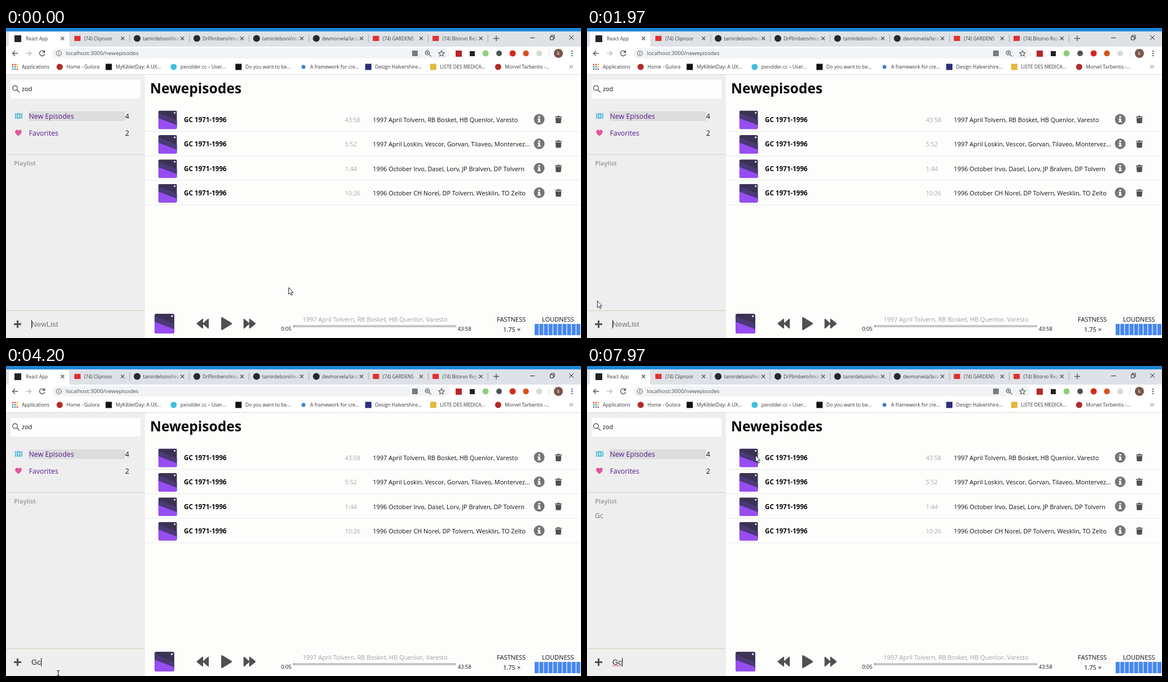
Recreate the animation shown at these times as an HTML page. Size 1018 by 550 pixels, loop 8000 ms.

```html
<!DOCTYPE html>
<html lang="en">
<head>
<meta charset="utf-8">
<title>Podcast player</title>
<style>
html, body { margin: 0; width: 100%; height: 100%; overflow: hidden; background: #fdfdfc; }
#stage { display: block; width: 1018px; height: 550px; font-family: "Open Sans", "Noto Sans", sans-serif; }
text { white-space: pre; }
.tab { font-size: 8.4px; fill: #3c4043; }
.mark { font-size: 8.6px; fill: #333639; }
.line { fill: none; stroke: #55585c; stroke-width: 1.4; }
.nav { font-size: 12.3px; fill: #551a8b; }
.title { font-size: 11.6px; font-weight: 700; fill: #080808; }
.time { font-size: 10.6px; fill: #a6a6a6; }
.desc { font-size: 10.9px; fill: #111; }
.small { font-size: 9.3px; fill: #111; }
.label { font-size: 11px; fill: #111; }
.input { font: 13.25px "Liberation Sans", Arial, sans-serif; fill: #222; }
.icon { fill: #505050; }
.caret { fill: #111; }

/* 8 s timeline: 1% = 80 ms */
#hint, #one, #two, #wavy, #item, #arrow, #beam { animation: 8s step-end infinite; }
#hint { animation-name: hint; }
#one { animation-name: one; }
#two { animation-name: two; }
#wavy { animation-name: wavy; }
#item { animation-name: item; }
#arrow { animation-name: arrowShow; }
#beam { animation-name: beamShow; }
@keyframes hint { 0% { visibility: visible } 52.125%, 100% { visibility: hidden } }
@keyframes one { 0% { visibility: hidden } 52.125% { visibility: visible } 52.5%, 100% { visibility: hidden } }
@keyframes two { 0% { visibility: hidden } 52.5%, 100% { visibility: visible } }
@keyframes wavy { 0% { visibility: hidden } 63%, 100% { visibility: visible } }
@keyframes item { 0% { visibility: hidden } 66.75%, 100% { visibility: visible } }
@keyframes arrowShow { 0% { visibility: visible } 28.5% { visibility: hidden } 80.6%, 100% { visibility: visible } }
@keyframes beamShow { 0% { visibility: hidden } 28.5% { visibility: visible } 80.6%, 100% { visibility: hidden } }
#arrowPath { animation: arrowMove 8s ease-in-out infinite; }
#beamPath { animation: beamMove 8s linear infinite; }
@keyframes arrowMove {
  0%, 12% { transform: translate(500px, 460px) }
  19.8%, 22.5% { transform: translate(0, 470px) }
  29.5% { transform: translate(92px, 540px) }
  78.8% { transform: translate(92px, 540px); animation-timing-function: ease-in }
  80.6% { transform: translate(135px, 512px); animation-timing-function: linear }
  87.1% { transform: translate(356px, 410px); animation-timing-function: linear }
  90.5% { transform: translate(385px, 300px); animation-timing-function: ease-out }
  97.2%, 100% { transform: translate(298px, 158px) }
}
@keyframes beamMove {
  0%, 28.5% { transform: translate(78px, 534px) }
  29.5%, 78.8% { transform: translate(92px, 545px) }
  80.6%, 100% { transform: translate(135px, 520px) }
}
</style>
</head>
<body>
<svg id="stage" viewBox="0 0 1018 550">
  <defs>
    <linearGradient id="fade"><stop offset="0" stop-color="#dee1e6" stop-opacity="0"/><stop offset="1" stop-color="#dee1e6"/></linearGradient>
    <clipPath id="round"><rect width="33" height="33" rx="3"/></clipPath>
    <g id="cover" clip-path="url(#round)">
      <path fill="#3b3254" d="M0 0h33v33H0z"/>
      <path fill="#4c3978" d="M0 4 33 17v10L0 14z"/>
      <path fill="#974df2" d="M0 13.500 33 26v7H0z"/>
      <circle cx="29" cy="4" r="1.6" fill="#e4e0ee"/>
    </g>
    <g id="info">
      <circle r="9.5" fill="#757575"/>
      <path fill="#fff" d="M-1.6-5.8h3.2v2.8h-3.2zM-2.8-1.6h4.4v5h1.3v1.8h-5.8V3.4h1.3V.2h-1.2z"/>
    </g>
    <path id="bin" class="icon" d="M-6-5.5h3.6l.8-1.2h3.2l.8 1.2H6v1.6H-6zM-5.2-3h10.4l-.6 8.3q-.1 1.2-1.3 1.2h-6.6q-1.2 0-1.3-1.2z"/>
    <path id="cross" class="line" d="M-3-3 3 3M3-3-3 3"/>
    <path id="skip" class="icon" d="M-10-7.5q0-2 1.5-1L0-1v-6.5q0-2 1.5-1L11-1q1 1 0 2L1.5 8.5Q0 9.5 0 7.5V1l-8.5 7.5q-1.5 1-1.5-1z"/>
  </defs>

  <rect width="1018" height="550" fill="#fdfdfc"/>

  <!-- browser -->
  <rect width="1018" height="34" fill="#dee1e6"/>
  <rect width="1018" height="6" fill="#1c86d8"/>
  <rect y="33" width="1018" height="49" fill="#fff"/>
  <path fill="#fff" d="M1 34q4 0 4-4V11q0-4 4-4h99q4 0 4 4v19q0 4 4 4z"/>
  <rect x="15" y="13" width="12" height="12" fill="#20232a"/>
  <text class="tab" x="35" y="22">React App</text>
  <use href="#cross" x="100" y="18.5"/>
  <g id="tabs"></g>
  <path class="line" d="M863 18.5h10M868 13.5v10"/>
  <path class="line" style="stroke:#222;stroke-width:1" d="M928 17.5h8M963.5 15.5h5.500v5.500h-5.500zM965 15v-2h6v6h-2M997 13l8 8M1005 13l-8 8"/>
  <path class="line" d="M21 45H11.500M16 40.500 11.500 45l4.500 4.500"/>
  <path class="line" style="stroke:#babcbe" d="M35 45h9.500M40 40.500l4.500 4.500-4.500 4.500"/>
  <path class="line" d="M67.500 41.500A4.700 4.700 0 1 0 68.700 46"/>
  <path fill="#55585c" d="M69 39v5h-5z"/>
  <rect x="82" y="36" width="704" height="18" rx="9" fill="#f1f3f4"/>
  <circle class="line" style="stroke-width:1" cx="93.5" cy="45" r="4.5"/>
  <path class="line" style="stroke-width:1.2" d="M93.500 44.500v3M93.500 42v1.200"/>
  <text x="106" y="48.3" font-size="9.76" fill="#4a4e52">localhost:3000/newepisodes</text>
  <rect x="719" y="40" width="10" height="10" fill="#777b80"/>
  <g class="line" style="stroke-width:1.2"><circle cx="746" cy="44" r="3.7"/><path d="m749 47 3.500 3.500M744 44h4M746 42v4"/></g>
  <path class="line" style="stroke-width:1.1" d="m771 40 1.500 3.400 3.700.4-2.800 2.500.8 3.700-3.200-1.900-3.200 1.900.8-3.700-2.800-2.500 3.700-.4z"/>
  <rect x="796" y="40" width="11" height="11" fill="#b5262b"/>
  <rect x="821" y="41" width="9" height="9" fill="#222"/>
  <circle cx="849" cy="45" r="5.5" fill="#8fd07c"/>
  <circle cx="873" cy="45" r="5" fill="#4c5358"/>
  <circle cx="897" cy="45" r="5.5" fill="#d6281e"/>
  <circle cx="920.5" cy="45" r="5.2" fill="#d8501c"/>
  <circle cx="944" cy="45" r="5.3" fill="#d9d9d6"/>
  <path stroke="#d5d7da" d="M961.500 38v14"/>
  <circle cx="978" cy="45" r="8" fill="#795548"/>
  <text x="978" y="48" font-size="8.5" fill="#fff" text-anchor="middle">k</text>
  <g fill="#55585c"><circle cx="1002" cy="41" r="1.2"/><circle cx="1002" cy="45" r="1.2"/><circle cx="1002" cy="49" r="1.2"/></g>
  <g id="marks"></g>
  <path class="line" style="stroke-width:1" d="m997.500 66 2.500 2.700-2.500 2.700M1001 66l2.500 2.700-2.500 2.700"/>
  <path stroke="#d9dad4" d="M0 82.500h1018"/>

  <!-- sidebar -->
  <rect y="83" width="246" height="467" fill="#eeeeef"/>
  <rect x="8" y="92" width="230" height="33" fill="#fefefe"/>
  <g class="line"><circle cx="16" cy="106.5" r="4.3"/><path d="m19 109.500 5 5"/></g>
  <text x="28" y="112" font-size="10.8" fill="#111">zod</text>
  <rect x="40" y="148" width="171" height="17" fill="#dcdcdd"/>
  <path fill="#62bdd8" d="M16 151h2v10h-2zM27 151h2v10h-2zM19 151h7v10h-7z"/>
  <path stroke="#e9f6fa" d="M22.500 153v6M20 156h5"/>
  <text class="nav" x="40.5" y="161">New Episodes</text>
  <path fill="#e0559b" d="M22 191.500c-9-6-5.500-11-2.700-11 1.600 0 2.400 1 2.700 2 .3-1 1.100-2 2.700-2 2.800 0 6.300 5-2.700 11z"/>
  <text class="nav" x="40.5" y="191">Favorites</text>
  <g font-size="12.3" fill="#111"><text x="211" y="161">4</text><text x="211" y="191">2</text></g>
  <path stroke="#d3d3ca" d="M0 224.500h246"/>
  <text x="14" y="243.5" font-size="10.7" font-weight="700" fill="#a6a6a6">Playlist</text>
  <text id="item" x="14" y="270" font-size="12.4" fill="#777">Gc</text>
  <path stroke="#cfcfb6" d="M0 501.500h246"/>
  <path stroke="#505050" stroke-width="3" d="M14 525.500h13M20.500 519v13"/>
  <g class="input">
    <g id="hint"><text x="45" y="530" fill="#757575">NewList</text><rect class="caret" x="45" y="518" width="1" height="15"/></g>
    <g id="one"><text x="45" y="530">G</text><rect class="caret" x="55" y="518" width="1" height="15"/></g>
    <g id="two"><text x="45" y="530">Gc</text><rect class="caret" x="62" y="518" width="1" height="15"/></g>
    <path id="wavy" fill="none" stroke="#d33" stroke-width=".9" d="m45 532.500 1.500-1.200 1.500 1.200 1.500-1.200 1.500 1.200 1.500-1.200 1.500 1.200 1.500-1.200 1.500 1.200 1.500-1.200 1.500 1.200 1.500-1.200"/>
  </g>

  <!-- episodes -->
  <text x="255" y="116" font-size="24.5" font-weight="700" fill="#080808">Newepisodes</text>
  <g id="rows"></g>

  <!-- player -->
  <use href="#cover" transform="translate(263 507) scale(1.06)"/>
  <use href="#skip" transform="translate(349 524.5) scale(-1 1)"/>
  <path class="icon" d="M381 515q0-3 2.500-1.500l15.500 9.500q2 1.500 0 3l-15.500 9.500q-2.500 1.500-2.500-1.500z"/>
  <use href="#skip" x="430.5" y="524.5"/>
  <text class="desc" style="fill:#a0a0a0" x="525" y="520.5">1997 April Tolvern, RB Bosket, HB Quenlor, Varesto</text>
  <rect x="509" y="527" width="288" height="4" fill="#c6c6c6"/>
  <rect x="509" y="527" width="1.2" height="4" fill="#4a6fa8"/>
  <text class="small" x="487" y="536.5">0:05</text>
  <text class="small" x="800" y="536.5">43:58</text>
  <text class="label" x="869" y="520.5">FASTNESS</text>
  <text class="label" x="880" y="539">1.75 ×</text>
  <text class="label" x="949" y="520.5">LOUDNESS</text>
  <g id="bars" fill="#4687f1"></g>

  <!-- pointers -->
  <g id="arrowPath"><path id="arrow" fill="#fff" stroke="#111" stroke-width=".9" d="M.5.5v12l2.700-2.400 1.900 4.200 1.900-.9-1.900-4h3.500z"/></g>
  <g id="beamPath"><path id="beam" fill="none" stroke="#222" stroke-width="1.1" d="M-2-4.500h1.500l1 .7 1-.7H3M.5-4v8M-2 4.500h1.500l1-.7 1 .7H3"/></g>
</svg>
<script>
const fill = (id, list, draw) => { document.getElementById(id).innerHTML = list.map(draw).join(''); };
const dot = (x, y, r, color) => `<circle cx="${x}" cy="${y}" r="${r}" fill="${color}"/>`;
const box = (x, y, w, h, color) => `<rect x="${x - w / 2}" y="${y - h / 2}" width="${w}" height="${h}" fill="${color}"/>`;
const text = (cls, x, y, s) => `<text class="${cls}" x="${x}" y="${y}">${s}</text>`;

const tabs = [
  ['video', '(74) Clipnoor'], ['code', 'tamirdelsoni/react'], ['code', 'DrPlimbero/music'],
  ['code', 'tamirdelsoni/react'], ['code', 'devmorvela/laravel'], ['video', '(74) GARDENS'], ['video', '(74) Bitorvo Repo']
];
fill('tabs', tabs, ([kind, name], i) => {
  const x = 126.5 + i * 105.7, isVideo = kind === 'video';
  const left = x + (isVideo ? 12 : 10);
  return (isVideo ? box(x, 18.5, 11, 9, '#e02f2f') : dot(x, 18.5, 6, '#24292e'))
    + `<svg x="${left}" y="8" width="${x + 76 - left}" height="22">${text('tab', 0, 14, name)}</svg>`
    + `<rect x="${x + 62}" y="9" width="15" height="20" fill="url(#fade)"/>`
    + `<use href="#cross" x="${x + 80}" y="18.5"/><path stroke="#a3a6aa" d="M${x + 92.5} 12v13"/>`;
});

const marks = [
  ['Home - Gulora', dot, '#b22b27'], ['MyKibletDay: A UX...', box, '#111'], ['pxnolder.cc – User...', dot, '#3fc0da'],
  ['Do you want to be...', box, '#111'], ['A framework for cre...', dot, '#3b82d0'], ['Design Halvershire...', box, '#2b2f7e'],
  ['LISTE DES MEDICA...', box, '#e2b93a'], ['Morvel Tarbentis -...', dot, '#b22b27']
];
const apps = ['#d9483b', '#d9483b', '#e8b02c', '#3c9a52', '#4b7fd6', '#e8b02c', '#3c9a52', '#4b7fd6', '#d9483b'];
// The first bookmark is short; the others are cut to one width.
fill('marks', marks, ([name, shape, color], i) => {
  const x = i ? 67 + i * 114.9 : 95;
  const icon = shape === dot ? dot(x, 69, i === 4 ? 3.5 : 5.5, color) : box(x, 69, 11, 11, color);
  return icon + text('mark', x + 12, 72, name);
});
document.getElementById('marks').innerHTML += text('mark', 28, 72, 'Applications')
  + apps.map((c, i) => box(12 + i % 3 * 4, 65 + Math.floor(i / 3) * 4, 2.5, 2.5, c)).join('');

const rows = [
  ['43:58', '1997 April Tolvern, RB Bosket, HB Quenlor, Varesto'],
  ['5:52', '1997 April Loskin, Vescor, Gorvan, Tilaveo, Montervez...'],
  ['1:44', '1996 October Irvo, Dasel, Lorv, JP Bralven, DP Tolvern'],
  ['10:26', '1996 October CH Norel, DP Tolvern, Wesklin, TO Zelto']
];
fill('rows', rows, ([time, desc], i) => `<g transform="translate(0 ${i * 43.4})">
  <use href="#cover" x="269.7" y="146.5"/>
  ${text('title', 315, 167, 'GC 1971-1996')}${text('time', 600, 167, time)}${text('desc', 649.5, 167, desc)}
  <use href="#info" x="944" y="162"/><use href="#bin" x="978" y="162.5"/>
  <path stroke="#dcdce4" stroke-dasharray="2 1.5" d="M247 183.5h771"/></g>`);

fill('bars', Array.from({ length: 10 }), (_, i) => `<rect x="${936 + i * 8.2}" y="525" width="7" height="20"/>`);
</script>
</body>
</html>
```
